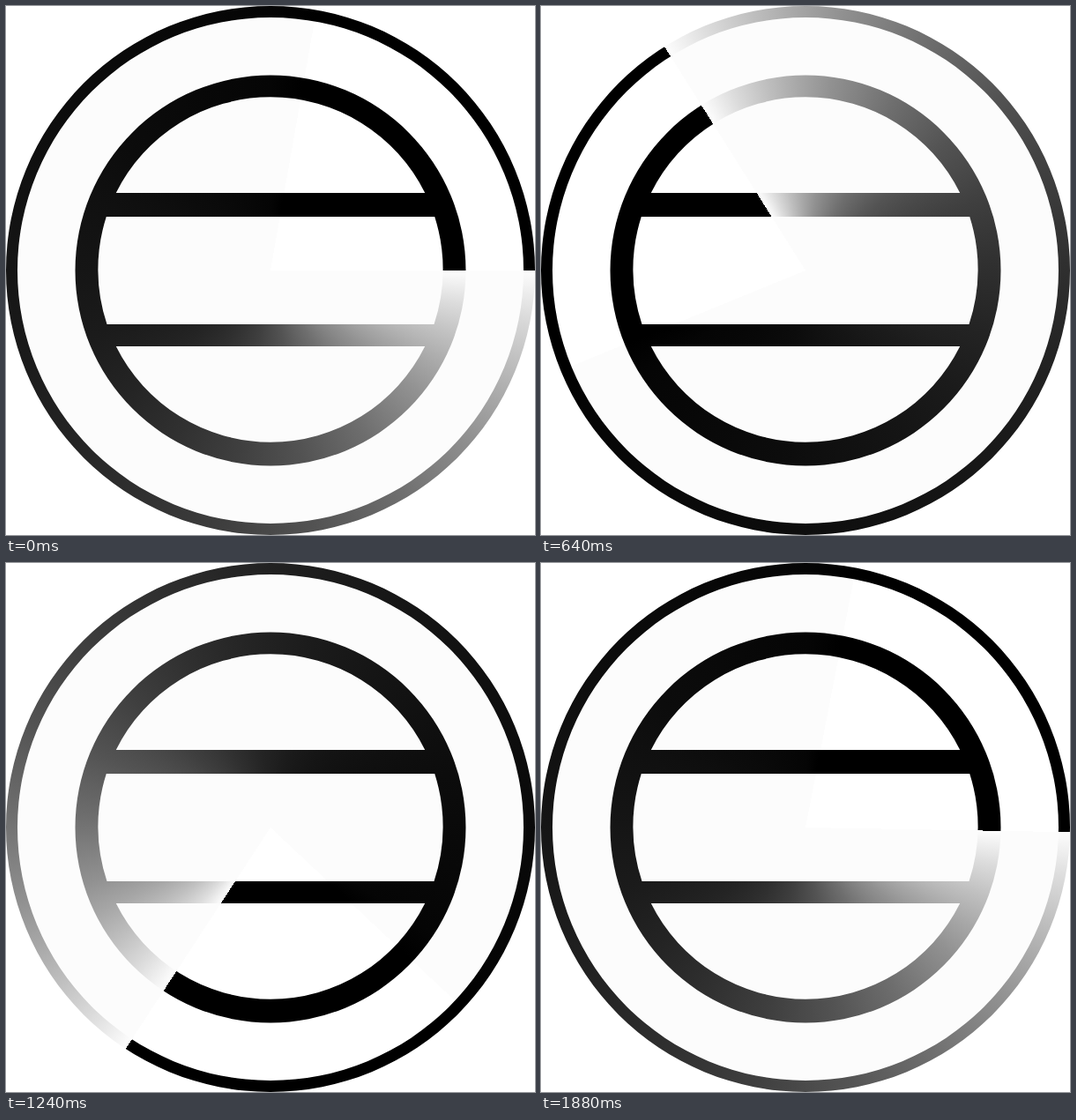
An HTML page for the animation above (1920 ms loop, 600 by 600 pixels).

```html
<!DOCTYPE html>
<html lang="en">
<head>
<meta charset="utf-8">
<title>Ring spinner</title>
<style>
@property --turn {
  syntax: "<angle>";
  inherits: true;
  initial-value: 0deg;
}

html, body {
  margin: 0;
  width: 100%;
  height: 100%;
  overflow: hidden;
  background: #fff;
}

/* 48 poses of 40 ms; the last one stands at 359deg */
.spinner {
  position: relative;
  width: 600px;
  height: 600px;
  animation: sweep 1920ms steps(48, end) infinite;
}

.glow, .mark {
  position: absolute;
  inset: 0;
}

.glow {
  border-radius: 50%;
  background: conic-gradient(from calc(90deg - var(--turn)), #fcfcfc 280deg, #fff 280deg);
}

/* The trail decays by a tenth per pose */
.mark {
  background: conic-gradient(from calc(90deg - var(--turn)),
    rgb(253 253 253) 0deg,
    rgb(220 220 220) 10deg,
    rgb(192 192 192) 20deg,
    rgb(167 167 167) 30deg,
    rgb(145 145 145) 40deg,
    rgb(110 110 110) 60deg,
    rgb(83 83 83) 80deg,
    rgb(63 63 63) 100deg,
    rgb(48 48 48) 120deg,
    rgb(36 36 36) 140deg,
    rgb(27 27 27) 160deg,
    rgb(21 21 21) 180deg,
    rgb(12 12 12) 220deg,
    rgb(5 5 5) 270deg,
    #000 280deg);
  clip-path: path(evenodd, "M0 300A300 300 0 0 1 600 300A300 300 0 0 1 0 300Z M13 300A287 287 0 0 1 587 300A287 287 0 0 1 13 300Z M78.5 300A221.5 221.5 0 0 1 521.5 300A221.5 221.5 0 0 1 78.5 300Z M124.8 212A195.6 195.6 0 0 1 475.2 212Z M113.8 239H486.2A195.6 195.6 0 0 1 485.5 361H114.5A195.6 195.6 0 0 1 113.8 239Z M124.8 386A195.6 195.6 0 0 0 475.2 386Z");
}

@keyframes sweep {
  from { --turn: 0deg; }
  to { --turn: calc(359deg * 48 / 47); }
}
</style>
</head>
<body>
<div class="spinner">
  <div class="glow"></div>
  <div class="mark"></div>
</div>
</body>
</html>
```
